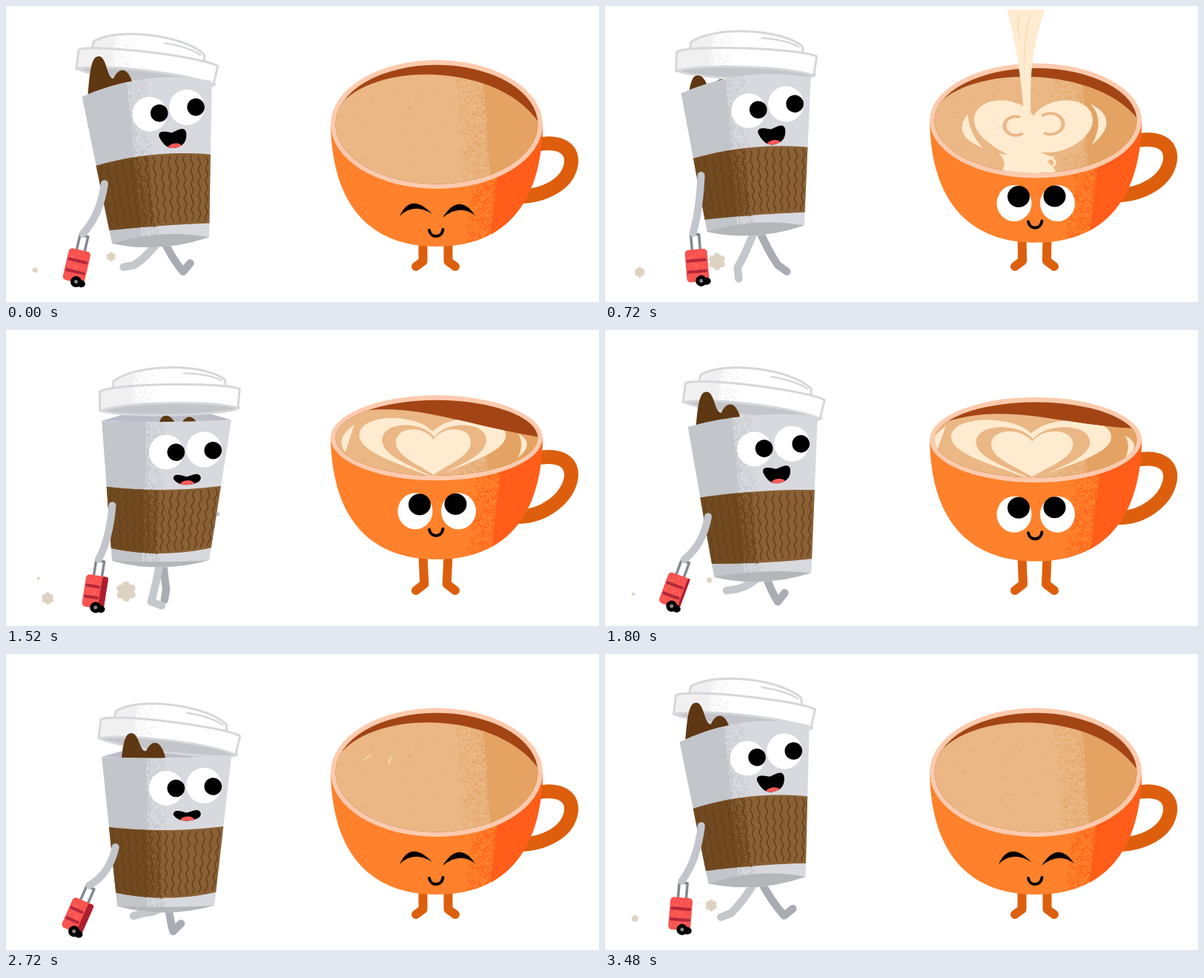
Write an HTML page with a canvas that moves like this. It is 800x400 px and loops after 3.52 s.

```html
<!DOCTYPE html>
<html lang="en">
<head>
<meta charset="utf-8">
<title>Coffee cups</title>
<style>
html, body { margin: 0; width: 100%; height: 100%; overflow: hidden; background: #fff; }
canvas { display: block; }
</style>
</head>
<body>
<canvas id="stage" width="800" height="400"></canvas>
<script>
const ctx = document.getElementById('stage').getContext('2d');
const LOOP = 3520, WALK = 880, STEP = 440, TAU = Math.PI * 2, DEG = Math.PI / 180;

// ---- motion helpers ----
const wave = (t, period, peak) => Math.cos(TAU * (t - peak) / period);
const pulse = (t, period, peak, sharp) => ((1 + wave(t, period, peak)) / 2) ** sharp;
const clamp = (v, lo, hi) => Math.max(lo, Math.min(hi, v));
const ramp = (t, a, b) => clamp((t - a) / (b - a), 0, 1);
const ease = (t, a, b) => {
  const s = ramp(t, a, b);
  return s * s * (3 - 2 * s);
};

let seed = 7;
const rnd = () => (seed = seed * 16807 % 2147483647) / 2147483647;
const specks = Array.from({ length: 1400 }, () => [rnd(), rnd()]);

// ---- drawing helpers ----
function shape(color, build) {
  ctx.beginPath();
  build();
  ctx.fillStyle = color;
  ctx.fill();
}
function line(color, width, build) {
  ctx.beginPath();
  build();
  ctx.strokeStyle = color;
  ctx.lineWidth = width;
  ctx.lineCap = ctx.lineJoin = 'round';
  ctx.stroke();
}
function oval(color, x, y, rx, ry = rx) {
  shape(color, () => ctx.ellipse(x, y, rx, ry, 0, 0, 7));
}
function poly(pts) {
  pts.forEach(p => ctx.lineTo(...p));
}
function group(draw) {
  ctx.save();
  draw();
  ctx.restore();
}
function grain(color, count, place) {
  ctx.fillStyle = color;
  for (const [a, b] of specks.slice(0, count)) {
    const [x, y] = place(a * a, b);
    ctx.fillRect(x, y, 1.4, 1.4);
  }
}
function crescent(color, x0, y0, cx, cy, x1, y1, bx, by) {
  shape(color, () => {
    ctx.moveTo(x0, y0);
    ctx.quadraticCurveTo(cx, cy, x1, y1);
    ctx.quadraticCurveTo(bx, by, x0, y0);
  });
}
function heart(color, x, top, w, h) {
  shape(color, () => {
    for (const s of [w, -w]) {
      ctx.moveTo(x, top + h * .22);
      ctx.bezierCurveTo(x + s * .12, top - h * .1, x + s * .5, top - h * .08, x + s * .5, top + h * .28);
      ctx.bezierCurveTo(x + s * .5, top + h * .6, x + s * .16, top + h * .8, x, top + h);
    }
  });
}

// ---- walking paper cup ----
// Ends of a segment given by its middle, width and slope.
function ends(x, y, width, deg) {
  const dx = width / 2, dy = dx * Math.tan(deg * DEG);
  return [[x - dx, y - dy], [x + dx, y + dy]];
}

function puff(t, born, x, y, driftX, driftY, size) {
  const age = (t - born + LOOP) % WALK, life = 400;
  if (age >= life) return;
  const left = Math.exp(-age / 130), r = size * Math.sqrt(1 - age / life);
  x += driftX * left;
  y += driftY * left;
  oval('#ded3c3', x, y, r * .75);
  for (let a = .5; a < TAU; a += TAU / 6) {
    oval('#ded3c3', x + Math.cos(a) * r * .65, y + Math.sin(a) * r * .65, r * .4);
  }
}

function leg(color, t, hx, hy) {
  const ax = 206 + 36 * wave(t, WALK, 820), ay = 350 + 28 * pulse(t, WALK, 120, 6);
  const turn = (60 - 112 * wave(t, WALK, 30)) * DEG;
  line(color, 10.5, () => {
    ctx.moveTo(hx, hy);
    ctx.quadraticCurveTo((hx + ax) / 2, (hy + ay) / 2 + 6, ax, ay);
    ctx.lineTo(ax + 15 * Math.cos(turn), ay + 15 * Math.sin(turn));
  });
}

function farArm(t, [sx, sy], land) {
  const hx = 270 + 65 * wave(t, WALK, STEP), hy = sy - 22 + 20 * land;
  line('#c2c5cb', 10, () => {
    ctx.moveTo(sx, sy);
    ctx.quadraticCurveTo((sx + hx) / 2 + 8, sy + 14, hx - 3, hy + 4);
  });
  line('#c2c5cb', 5, () => {
    for (let a = -2.4; a < 0; a += .7) {
      ctx.moveTo(hx, hy);
      ctx.lineTo(hx + Math.cos(a) * 7, hy + Math.sin(a) * 7);
    }
  });
}

function coffeeDrop(t) {
  const age = t % WALK - 490;
  if (Math.abs(age) > 110) return;
  group(() => {
    ctx.translate(271 + age * .12, 15 + age * age * .0065);
    shape('#5e3713', () => {
      ctx.moveTo(0, 8);
      ctx.bezierCurveTo(-4, 6, -8, 2, -7, -2);
      ctx.bezierCurveTo(-6, -8, 6, -8, 7, -2);
      ctx.bezierCurveTo(8, 2, 4, 6, 0, 8);
    });
  });
}

function lid(x, y, deg) {
  const rim = '#d6d7da', shade = '#f0f0f1';
  const outlined = build => {
    shape('#fff', build);
    group(() => {
      ctx.clip();
      ctx.fillStyle = shade;
      ctx.fillRect(-100, -50, 52, 90);
      grain(shade, 400, (a, b) => [-48 + a * 26, -45 + b * 70]);
    });
    line(rim, 3, build);
  };
  group(() => {
    ctx.translate(x, y);
    ctx.rotate(deg * DEG);
    oval('#c3c5cb', 0, 16, 94, 9);
    line(rim, 3, () => ctx.ellipse(0, 16, 94, 9, 0, 0, 7));
    outlined(() => {
      ctx.moveTo(-77, -8);
      ctx.lineTo(-75, -22);
      ctx.bezierCurveTo(-45, -45, 45, -45, 75, -22);
      ctx.lineTo(77, -8);
    });
    line(rim, 2.5, () => {
      ctx.moveTo(20, -31);
      ctx.quadraticCurveTo(52, -30, 70, -21);
    });
    outlined(() => {
      ctx.moveTo(-94, -8);
      ctx.bezierCurveTo(-75, -19, 70, -19, 95, -9);
      ctx.lineTo(92, 17);
      ctx.bezierCurveTo(55, 6, -55, 6, -94, 18);
      ctx.closePath();
    });
  });
}

// Two joined peaks, the higher one on the outer side.
function splash(t, x, y, land) {
  const side = clamp(2.5 * wave(t, WALK, -20), -1, 1);
  const rise = 6 + 38 * pulse(t, STEP, -5, 1), low = rise * .45;
  group(() => {
    ctx.translate(x - side * (64 - 45 * land * land), y - rise);
    ctx.scale(side < 0 ? -1 : 1, 1);
    shape('#5e3713', () => {
      ctx.moveTo(-16, 56);
      ctx.bezierCurveTo(-13, 14, -10, 0, -1, 0);
      ctx.bezierCurveTo(10, 0, 10, low + 12, 19, low + 10);
      ctx.bezierCurveTo(23, low, 32, low - 6, 39, low + 4);
      ctx.quadraticCurveTo(46, low + 14, 48, 56);
    });
  });
}

function suitcase(t, [sx, sy], land, sink) {
  const hx = 114 + 11 * wave(t, STEP, 200), hy = 307 + 7 * sink;
  group(() => {
    ctx.translate(hx, hy);
    ctx.rotate((9 + 15 * wave(t, STEP, 90)) * DEG);
    ctx.translate(2, 44);
    line('#85878f', 3.5, () => {
      poly([[-5, -20], [-5, -42], [6, -42], [6, -20]]);
    });
    shape('#f9534f', () => ctx.roundRect(-15, -22, 30, 44, 5));
    grain('#ff7770', 30, (a, b) => [-12 + a * 22, -19 + b * 36]);
    const panel = 13 * land;
    if (panel > 1) shape('#ad1e2d', () => ctx.roundRect(15 - panel, -22, panel, 44, 3));
    line('#b3273b', 4, () => {
      for (const y of [-7, 8]) {
        ctx.moveTo(-12, y);
        ctx.lineTo(12 - panel, y);
      }
    });
    oval('#000', 11, 22, 6, 5);
    oval('#000', 4, 21, 7.5);
    oval('#888', 4, 21, 2.5);
  });
  line('#c2c5cb', 10, () => {
    ctx.moveTo(sx, sy);
    ctx.quadraticCurveTo((sx + hx) / 2 + (sx - hx) * .3, (sy + hy) / 2 + 9, hx, hy);
  });
}

function cupFace(deg, gape) {
  oval('#fff', 0, 0, 23.5);
  ctx.rotate(deg * DEG);
  oval('#fff', 51, 0, 24);
  oval('#000', 13, 1, 11.8);
  oval('#000', 63, 2, 11.8);
  ctx.translate(25, 39);
  if (gape < 7) {
    line('#000', 4, () => {
      ctx.moveTo(-14, -4);
      ctx.quadraticCurveTo(-2, 11, 17, 4);
    });
    return;
  }
  const h = gape / 2;
  shape('#000', () => {
    ctx.moveTo(-18, -h + 5);
    ctx.bezierCurveTo(-18, -h - 4, -8, -h, 0, -h + 3);
    ctx.bezierCurveTo(9, -h + 1, 18, -h - 3, 19, -h + 6);
    ctx.bezierCurveTo(18, h * .8, 8, h, 0, h);
    ctx.bezierCurveTo(-10, h, -15, h * .3, -18, -h + 5);
  });
  ctx.clip();
  oval('#ff5a58', 0, h, 10, 6);
}

function paperCup(t) {
  // The rim lurches forward just after the whole cup sinks into each step.
  const land = pulse(t, STEP, 140, 2.5), sink = pulse(t, STEP, 118, 2.5);
  const topX = 188 + 46 * land, topY = 107 + 38 * sink, tilt = -7.5 + 11.2 * land;
  const footX = 203 + 13 * pulse(t, STEP, 100, 1.5), footY = 301 + 40 * pulse(t, STEP, 92, 2);
  const [tl, tr] = ends(topX, topY, 175, tilt);
  const [bl, br] = ends(footX, footY, 131, -4 + 6 * land);
  const bow = 15 - 27 * land, under = 9 - 17 * land;

  const P = (u, v) => {
    const mix = k => (1 - v) * (tl[k] + (tr[k] - tl[k]) * u) + v * (bl[k] + (br[k] - bl[k]) * u);
    return [mix(0), mix(1) - (bow * (1 - .5 * v) - 7 * v) * 4 * u * (1 - u)];
  };
  const edge = (v, u0, u1) => Array.from({ length: 21 }, (_, i) => P(u0 + (u1 - u0) * i / 20, v));
  const floor = () => ctx.quadraticCurveTo(footX, footY + 18, ...bl);

  farArm(t, P(.9, .72), land);
  leg('#aaacb4', t, footX + 3, footY - 2);
  leg('#c4c7cc', t + STEP, footX, footY - 2);
  coffeeDrop(t);
  if (bow < 8) {
    shape('#bbbdc9', () => {
      ctx.moveTo(...tl);
      ctx.quadraticCurveTo(topX, topY - 30, ...tr);
      poly(edge(0, 1, 0));
    });
  }
  lid(topX + 6 * land, topY - 34 + 4 * sink, 1.8 + 5.5 * wave(t, WALK, 50));
  splash(t, topX, topY, land);

  group(() => {
    shape('#d8d9de', () => {
      poly(edge(0, 0, 1));
      ctx.lineTo(...br);
      floor();
      ctx.closePath();
    });
    ctx.clip();
    shape('#c2c5ca', () => poly([...edge(0, 0, .34), P(.31, 1.1), P(0, 1.1)]));
    grain('#c2c5ca', 1200, (a, b) => P(.33 + a * .16, b * 1.05));
    const band = (color, end) =>
      shape(color, () => poly([...edge(.47, -.01, end), ...edge(.91, end, -.01)]));
    band('#8a6035', 1.01);
    band('#714a20', .32);
    grain('#714a20', 900, (a, b) => P(.315 + a * .14, .47 + b * .44));
    line('#65411d', 1.6, () => {
      for (let i = 0; i < 15; i++) {
        for (let j = 0; j <= 28; j++) {
          const [x, y] = P(.03 + i * .067, .485 + j * .0145);
          ctx[j ? 'lineTo' : 'moveTo'](x + Math.sin(j * 1.15 + i * .8) * 1.6, y);
        }
      }
    });
    if (under > -6) {
      shape('#b5b6b9', () => {
        ctx.moveTo(...bl);
        ctx.quadraticCurveTo(footX, footY - 2 * under, ...br);
        floor();
      });
    }
  });

  group(() => {
    ctx.translate(topX + 4 - 7 * land, topY + 33.5 + 15 * land);
    cupFace(tilt - 3.5, 24 - 26 * land * land);
  });
  suitcase(t, P(.04, .6), land, sink);
  puff(t, 545, 138, 336, 50, 36, 15);
  puff(t, 545, 36, 356, 42, 14, 9);
  puff(t, 250, 42, 334, 36, 32, 13);
}

// ---- orange mug ----
const CREAM = '#ffebd0', TAN = '#eab785', X = 581;

function pouredHeart(grow) {
  ctx.translate(0, 70 * (1 - grow));
  ctx.scale(grow, grow);
  crescent(CREAM, -92, -12, -114, 28, -71, 52, -88, 28);
  crescent(CREAM, 74, -32, 116, -2, 76, 46, 94, -2);
  heart(CREAM, -3, -38, 160, 132);
  line(TAN, 5, () => ctx.ellipse(-27, 10, 15, 18, 0, 1, 5));
  line(TAN, 5, () => ctx.ellipse(20, 6, 17, 20, 0, -2.2, 2));
  crescent(TAN, -78, 25, -45, 75, -12, 80, -58, 90);
  crescent(TAN, 68, 30, 40, 65, 6, 60, 50, 90);
  shape(CREAM, () => {
    ctx.moveTo(-50, 62);
    ctx.quadraticCurveTo(-25, 72, -12, 50);
    ctx.quadraticCurveTo(15, 70, 28, 98);
    ctx.lineTo(-50, 104);
    ctx.quadraticCurveTo(-35, 82, -50, 62);
  });
  line(CREAM, 3, () => ctx.ellipse(12, 80, 14, 11, 0, -1.5, 1.5));
}

function nestedHearts(spread) {
  ctx.scale(1 + .2 * spread, 1);
  crescent(CREAM, -101, -36, -126, 4, -112, 38, -108, 8);
  crescent(CREAM, 100, -12, 122, 14, 100, 52, 108, 14);
  heart(CREAM, -5, -52, 180, 158);
  heart(TAN, -3, -33, 128, 140);
  heart(CREAM, -4, -22, 92, 120);
}

function looseSwirls(fade) {
  ctx.scale(1, 1 - fade * .15);
  crescent(CREAM, -101, 5, -108, -52, -38, -40, -88, -38);
  crescent(CREAM, 32, -30, 88, -34, 104, 22, 78, -14);
  crescent(CREAM, -107, 33, -100, 48, -82, 54, -98, 52);
  crescent(CREAM, -24, -8, -92, -22, -46, 39, -50, 2);
  crescent(CREAM, 9, 2, 92, -18, 20, 42, 56, 10);
  crescent(CREAM, 58, 68, 72, 65, 78, 54, 68, 70);
  oval(CREAM, -42, 62, 12, 6);
  oval(CREAM, 10, 28, 12, 5);
  oval(CREAM, 14, 10, 7, 5);
  line(CREAM, 4, () => {
    ctx.moveTo(-22, 0);
    ctx.quadraticCurveTo(-30, 20, 2, 36);
    ctx.moveTo(-2, 20);
    ctx.lineTo(22, 22);
    ctx.moveTo(4, 45);
    ctx.lineTo(24, 46);
  });
}

function latteArt(t, cy, r) {
  const layer = (alpha, draw) => alpha > 0 && group(() => {
    ctx.globalAlpha = alpha;
    ctx.translate(X, cy);
    ctx.scale(1, r / 100);
    draw();
  });
  const grow = ramp(t, 430, 700), fade = ramp(t, 2400, 2680);
  if (grow) layer(1 - ramp(t, 840, 1040), () => pouredHeart(.15 + .85 * grow));
  layer(ramp(t, 800, 1000) * (1 - ramp(t, 2000, 2240)), () => nestedHearts(ramp(t, 1250, 1800)));
  layer(ramp(t, 2040, 2260) * (1 - fade), () => looseSwirls(fade));
  layer(ramp(t, 2480, 2640) * (1 - ramp(t, 2700, 2840)) * .6, () => {
    crescent(CREAM, -101, -18, -96, -27, -86, -31, -92, -24);
    crescent(CREAM, -64, -12, -68, -22, -60, -29, -61, -22);
  });
}

function coffee(t, cy, r) {
  const lean = ease(t, 700, 1100) * (1 - ease(t, 2220, 2640));
  const settle = t > 1100 ? .2 * (1 - ramp(t, 2400, 3360)) : 0;
  const rock = wave(t, WALK, 40) * Math.max(lean, settle);
  const left = cy + r * (-.1 - .4 * lean + .15 * rock), right = cy + r * (.06 - .15 * lean - .2 * rock);
  group(() => {
    ctx.beginPath();
    ctx.ellipse(X, cy, 136.5, r, 0, 0, 7);
    ctx.clip();
    ctx.fillStyle = '#a34414';
    ctx.fillRect(430, 40, 300, 240);
    shape(TAN, () => {
      ctx.moveTo(430, left + 8);
      ctx.lineTo(440, left);
      ctx.bezierCurveTo(470 + 70 * lean, cy - r * 1.1, 670 - 70 * lean, cy - r * (1.12 - .72 * lean), 723, right);
      ctx.lineTo(730, 270);
      ctx.lineTo(430, 270);
    });
    ctx.clip();
    const shade = '#e4a363';
    shape(shade, () => poly([[642, 60], [735, 60], [735, 260], [656, 260]]));
    grain(shade, 1400, (a, b) => [642 + b * 14 - a * 38, 60 + b * 200]);
    grain('#d99d63', 60, (a, b) => [455 + Math.sqrt(a) * 240, cy + (b * 1.8 - .9) * r]);
    latteArt(t, cy, r);
  });
}

function mugFace(t, y) {
  const open = Math.min(ramp(t, 240, 360), 1 - ramp(t, 2080, 2200));
  if (!open) {
    crescent('#000', 531, y + 6, 546, y - 27, 575, y + 3, 550, y - 13);
    crescent('#000', 589, y + 8, 611, y - 27, 633, y + 5, 612, y - 11);
  } else {
    group(() => {
      ctx.translate(0, y);
      ctx.scale(1, .2 + .8 * open);
      oval('#fff', 552, 0, 23.5, 24.5);
      oval('#fff', 610.5, 0, 23.5, 24.5);
      oval('#000', 558, -9, 15, 14.5);
      oval('#000', 606.5, -9.5, 15, 14.5);
    });
  }
  if (y < 237) {
    shape('#000', () => {
      ctx.moveTo(572, y + 23);
      ctx.quadraticCurveTo(582, y + 25, 592, y + 22);
      ctx.bezierCurveTo(594, y + 33, 590, y + 41, 583, y + 41);
      ctx.bezierCurveTo(575, y + 41, 572, y + 33, 572, y + 23);
    });
  } else {
    line('#000', 4, () => {
      ctx.moveTo(571, y + 25);
      ctx.bezierCurveTo(573, y + 36, 588, y + 36, 589.5, y + 24);
    });
  }
}

function milkStream(t) {
  const top = 5 + 190 * ramp(t, 900, 1060), end = 5 + 190 * ramp(t, 320, 440);
  if (end <= top) return;
  group(() => {
    ctx.beginPath();
    ctx.rect(530, top, 80, end - top);
    ctx.clip();
    shape(CREAM, () => {
      ctx.moveTo(543, 5);
      ctx.bezierCurveTo(553, 55, 562, 80, 569, 196);
      ctx.lineTo(575, 196);
      ctx.bezierCurveTo(573, 90, 573, 70, 593, 5);
    });
    crescent('#f8dfbe', 576, 5, 565, 45, 566, 105, 561, 35);
    crescent('#f8dfbe', 560, 8, 558, 25, 560, 48, 552, 25);
  });
}

function loveHeart(t) {
  const rise = ramp(t, 2180, 2560), size = Math.min(1, rise * 4, (1 - rise) * 3);
  if (!size) return;
  group(() => {
    ctx.translate(595 + Math.sin(rise * 7 - 2.6) * 4, 56 - (rise - .37) * 75);
    ctx.rotate(.22);
    ctx.scale(size, size);
    heart('#ff433f', 0, -15, 32, 30);
  });
}

function mug(t) {
  const tip = ease(t, 500, 1080) * (1 - ease(t, 1900, 2440));
  const hop = tip * tip * pulse(t, STEP, 320, 2);
  const cy = 160 - 11 * tip - 17 * hop, ry = 87 - 29.5 * tip;
  const base = 325 - 12 * tip - 16 * hop, dark = '#dd5f0d';

  line(dark, 19, () => {
    ctx.moveTo(712, cy + 28);
    ctx.bezierCurveTo(744, cy + 21, 765, cy + 30, 762.5, cy + 53);
    ctx.bezierCurveTo(758, cy + 82, 725, cy + 97 + 10 * tip, 690, 194 + cy * .4);
  });
  const bend = (325 - base) * .12;
  line(dark, 12, () => {
    for (const s of [-1, 1]) {
      const x = 579.5 + s * 17;
      ctx.moveTo(x, base - 6);
      ctx.lineTo(x - s * bend, 345 - bend);
      ctx.lineTo(579.5 + s * 26.5, 352);
    }
  });
  group(() => {
    shape('#ff812b', () => {
      ctx.moveTo(438, cy);
      ctx.bezierCurveTo(440, cy + 117, 498, base, X, base);
      ctx.bezierCurveTo(664, base, 722, cy + 117, 724, cy);
    });
    ctx.clip();
    const shade = '#ff5d19';
    shape(shade, () => poly([[678, 100], [730, 100], [730, 330], [652, 330]]));
    grain(shade, 1400, (a, b) => [678 - b * 26 - a * 34, 100 + b * 230]);
  });
  oval('#fecaad', X, cy, 143, ry);
  coffee(t, cy, ry - 6.5);
  mugFace(t, 278 - 28 * tip - 28 * hop);
  milkStream(t);
  loveHeart(t);
}

const start = performance.now();
function tick() {
  const t = Math.floor((performance.now() - start) % LOOP / 40) * 40;
  ctx.fillStyle = '#fff';
  ctx.fillRect(0, 0, 800, 400);
  paperCup(t);
  mug(t);
  requestAnimationFrame(tick);
}
tick();
</script>
</body>
</html>
```
